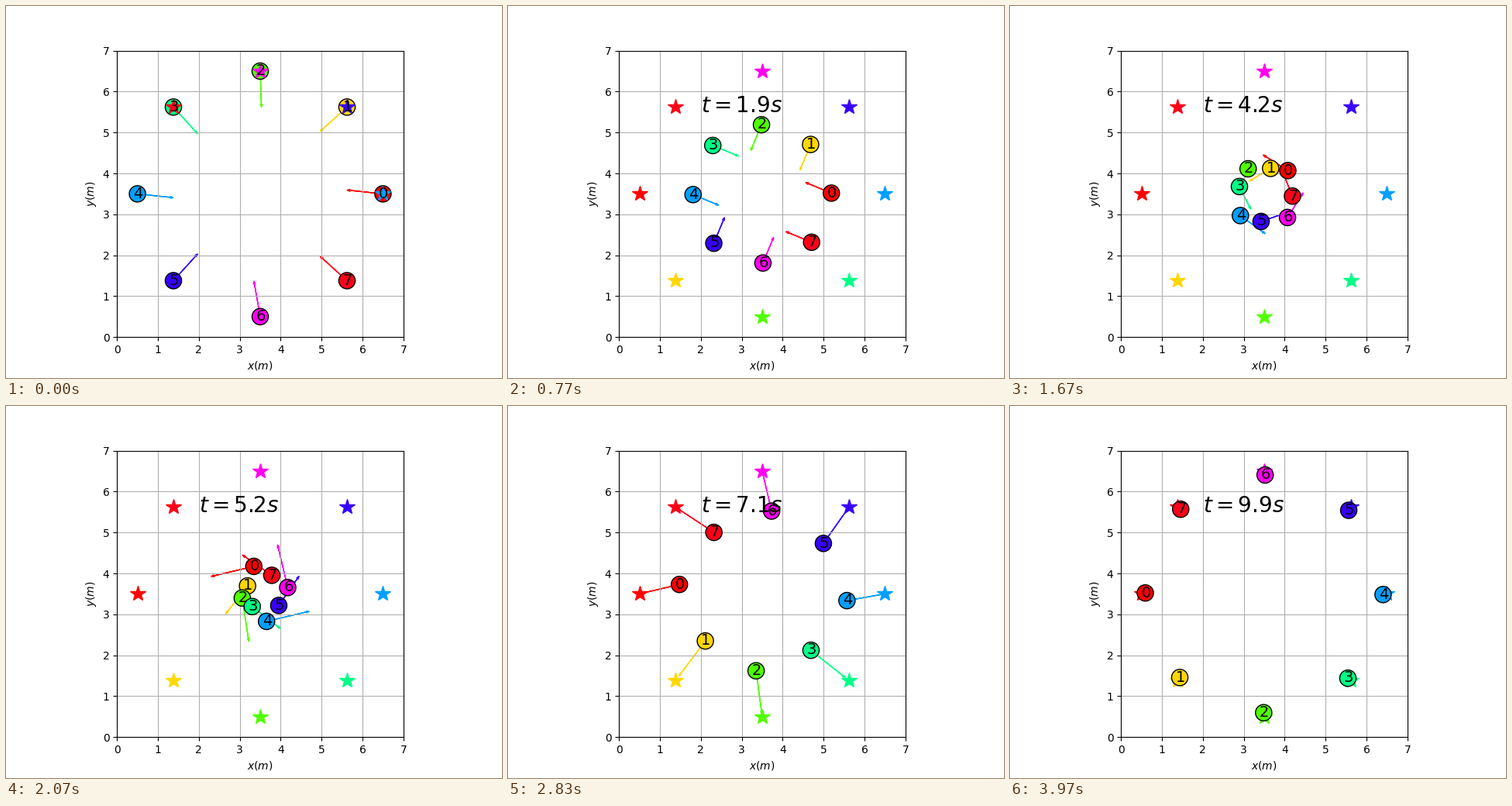
Animation, 640 px wide and 480 px high, one loop 4010 ms. Source, as a matplotlib script:

```python
import matplotlib.pyplot as plt
import numpy as np
from matplotlib.animation import FuncAnimation
from matplotlib.patches import Circle

LOOP_MS = 4010
TICKS = 200            # drawn frames per loop
INTERVAL = LOOP_MS / TICKS
LEAD_MS = 15           # look ahead so that changes never come late
SCREEN_FPS = 30        # the 25 steps per second appear on a 30 Hz raster
STEP_FPS = 25
STEPS = 100            # simulation steps of 0.1 s
COUNT = 8
RADIUS = 0.2
ARRIVE = 0.1           # distance at which a robot parks
CENTER = 3.5 + 3.5j


def polar(r, degrees):
    return r * np.exp(1j * np.radians(degrees))


def toward(p):
    return (goals - p) / abs(goals - p)


bearing = np.arange(COUNT) * 45.0
angle = np.radians(bearing)
start = CENTER + polar(3, bearing)
goals = CENTER - polar(3, bearing)

# Shared spiral: everyone closes in, swirls round the centre and leaves
times = np.array([0, 1.9, 3.2, 5.2, 6.2])
radius = [3, 1.69, 1.043, 0.54, 1.10]
turn = [0, 0.6, 7.2, 103, 162]

# Individual differences, as waves over the starting bearing
even = np.cos(4 * angle)                       # +1, -1, +1, ...
sway = np.cos(angle + np.pi / 4)
spread = 0.09 * even + 0.06 * np.cos(2 * angle) - 0.12 * np.sin(angle)
spread_at = [0, 0, 0, 1, 0.85]
sway_at = [0, 0, 3, 0, -4]

pos = np.array([CENTER + polar(r + k * spread, bearing + a + s * sway)
                for r, a, k, s in zip(radius, turn, spread_at, sway_at)])
inward = bearing + 180
vel = np.array([
    polar(0.81, inward - 6 * np.cos(2 * angle) - 4 * np.sin(angle)),
    polar(0.61, inward - 22.5 * even),
    polar(0.55, inward - 34 - 7.5 * even),
    toward(pos[3]) * (0.9 + 0.1 * even),
    toward(pos[4]),
])


def crossing(t):
    """Cubic Hermite path between the key times, with its derivative."""
    k = np.searchsorted(times, t, side="right") - 1
    h = times[k + 1] - times[k]
    s = (t - times[k]) / h
    p0, p1, v0, v1 = pos[k], pos[k + 1], vel[k] * h, vel[k + 1] * h
    a = 2 * p0 - 2 * p1 + v0 + v1
    b = 3 * p1 - 3 * p0 - 2 * v0 - v1
    p = ((a * s + b) * s + v0) * s + p0
    v = ((3 * a * s + 2 * b) * s + v0) / h
    return p, v


def homing(t):
    """Unit speed straight to the goal, then parked just short of it."""
    left = abs(goals - pos[-1]) - (t - times[-1])
    moving = left > ARRIVE
    u = vel[-1]
    return goals - u * np.where(moving, left, 0.097), u * moving


def state(t):
    return crossing(t) if t < times[-1] else homing(t)


def step_at(tick):
    raster = int((tick * INTERVAL + LEAD_MS) * SCREEN_FPS / 1000)
    return min(int((raster + 0.5) * STEP_FPS / SCREEN_FPS), STEPS - 1)


fig, ax = plt.subplots(figsize=(6.4, 4.8), dpi=100)
ax.set_aspect("equal")
ax.set_xlim(0, 7)
ax.set_ylim(0, 7)
ax.set_xticks(range(8))
ax.set_yticks(range(8))
ax.set_xlabel("$x(m)$")
ax.set_ylabel("$y(m)$")
ax.grid(True)

colors = plt.get_cmap("hsv", COUNT)(np.arange(COUNT))
stars, discs, arrows, labels = [], [], [], []
for i, color in enumerate(colors):
    g, p = goals[i], start[i]
    stars += ax.plot(g.real, g.imag, "*", color=color, markersize=15, zorder=2)
    discs.append(ax.add_patch(Circle((p.real, p.imag), RADIUS, facecolor=color,
                                     edgecolor="black", zorder=2.5)))
    arrows.append(ax.arrow(p.real, p.imag, 0.1, 0.1, width=0.001,
                           head_width=0.05, color=color))
    labels.append(ax.text(0, 0, str(i), fontsize=14, zorder=4))
clock = ax.text(2, 5.5, "", fontsize=20, zorder=4)


def draw(tick):
    step = step_at(tick)
    t = step / 10
    p, v = state(t)
    for i in range(COUNT):
        x, y = p[i].real, p[i].imag
        moving = bool(abs(v[i]) > 0)
        discs[i].center = x, y
        labels[i].set_position((x - 0.1, y - 0.1))
        arrows[i].set_visible(moving)
        if moving:
            arrows[i].set_data(x=x, y=y, dx=v[i].real, dy=v[i].imag)
        # the later goals lie on top of the discs only at the start
        stars[i].set_zorder(3 if step == 0 and i >= COUNT // 2 else 2)
    clock.set_text(f"$t={t:.1f}s$" if step else "")
    return [*stars, *discs, *arrows, *labels, clock]


anim = FuncAnimation(fig, draw, frames=TICKS, interval=INTERVAL,
                     init_func=lambda: draw(0), repeat=True, repeat_delay=0)
plt.show()
```
